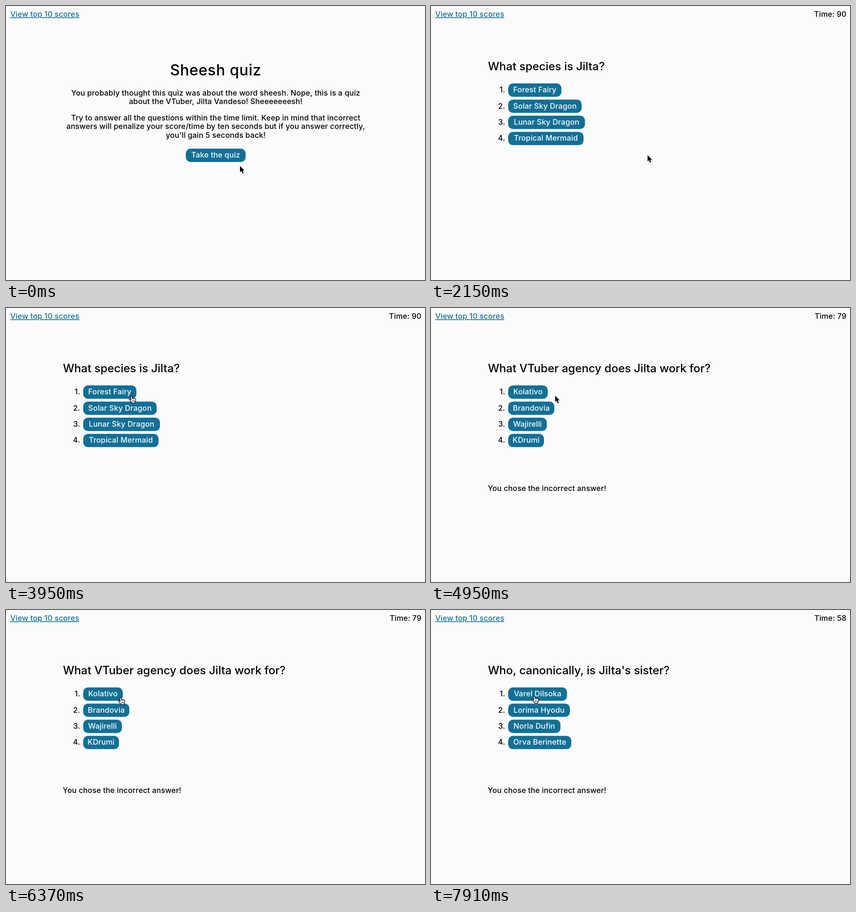
These frames come from a looping animation (890 px wide and 584 px high, 8 s). An HTML page:

```html
<!DOCTYPE html>
<html lang="en">
<head>
<meta charset="utf-8">
<title>Sheesh quiz</title>
<style>
  html, body { margin: 0; width: 100%; height: 100%; overflow: hidden; background: #fbfbfb; }
  svg { display: block; width: 890px; height: 584px; }
  text {
    font: 500 16px Inter, "Open Sans", sans-serif;
    font-optical-sizing: none;
    letter-spacing: .01em;
    white-space: pre;
  }
  .title { font-size: 32px; letter-spacing: .019em; }
  .question { font-size: 24px; letter-spacing: 0; }
  .link { fill: #127096; text-decoration: underline; }
  .middle { text-anchor: middle; }
  .end { text-anchor: end; }
  .button rect { fill: #127096; }
  .button text { fill: #fbfbfb; }
</style>
</head>
<body>
<svg viewBox="0 0 890 584">
  <text class="link" x="9" y="23">View top 10 scores</text>
  <text class="end" id="timer" x="882.5" y="23"></text>
  <g id="page"></g>
  <g id="cursor">
    <path id="arrow" d="M0 0V13.2L3 10.5L5.4 16L7.8 15L5.4 9.7H9.6Z"
          stroke="#fff" stroke-width="1" paint-order="stroke"/>
    <g id="hand" stroke="#000" stroke-linejoin="round" stroke-linecap="round">
      <path fill="#fff" stroke-width="1.2" d="M-1.4 1C-1-.6 .9-.6 1.3 1L2.4 5.2C3.2 4.3 4.6 4.5 5 5.6
        C5.8 4.9 7.1 5.2 7.3 6.2C8.3 5.8 9.4 6.4 9.5 7.5C9.8 9.6 9.5 11 8.4 12.6L8 15.5H1L.4 13.6
        C-1 12-3 10.3-4.4 8.5C-5 7.3-3.5 6.6-2.4 7.4L-.6 9Z"/>
      <path fill="none" stroke-width=".8" d="M2.6 10V13M4.7 10V13M6.8 10V13M2.4 5.2L2.8 7.5M5 5.6L5.2 7.5"/>
    </g>
  </g>
</svg>
<script>
const LOOP = 8000, START = 1990;
const CLICKS = [4900, 6400, 7500];   // wrong answers, ten seconds each
const TICKS = [4600, 7200];          // one second each

const INTRO = [
  [191, "You probably thought this quiz was about the word sheesh. Nope, this is a quiz"],
  [209, "about the VTuber, Jilta Vandeso! Sheeeeeeesh!"],
  [244, "Try to answer all the questions within the time limit. Keep in mind that incorrect"],
  [262, "answers will penalize your score/time by ten seconds but if you answer correctly,"],
  [281, "you'll gain 5 seconds back!"],
];

// Each choice is a label and the width of its button.
const QUESTIONS = [
  ["What species is Jilta?",
    [["Forest Fairy", 113], ["Solar Sky Dragon", 156], ["Lunar Sky Dragon", 163], ["Tropical Mermaid", 160]]],
  ["What VTuber agency does Jilta work for?",
    [["Kolativo", 84], ["Brandovia", 98], ["Wajirelli", 82], ["KDrumi", 76]]],
  ["What is the name of Jilta's companion?",
    [["Wuma", 69], ["Tirf", 49], ["Norla", 63], ["Ashmu", 74]]],
  ["Who, canonically, is Jilta's sister?",
    [["Varel Dilsoka", 125], ["Lorima Hyodu", 131], ["Norla Dufin", 111], ["Orva Berinette", 134]]],
];

// Pointer stops: time, x, y
const PATH = [
  [0, 497, 341], [20, 497, 341], [770, 454, 318], [910, 461, 320], [1310, 460, 318],
  [2830, 460, 318], [3950, 266, 187], [4900, 264, 187], [5630, 244, 187],
  [6400, 243, 186], [7170, 229, 182], [7500, 228, 182], [7910, 219, 183], [LOOP, 219, 183],
];

const $ = id => document.getElementById(id);
const label = (x, y, content, style = "") => `<text class="${style}" x="${x}" y="${y}">${content}</text>`;
const passed = (times, t) => times.filter(time => t >= time).length;

function button(content, { x, y, width }) {
  return `<g class="button"><rect x="${x}" y="${y}" width="${width}" height="28.4" rx="10"/>` +
    label(x + width / 2, y + 19.2, content, "middle") + "</g>";
}

function introPage() {
  const box = { x: 382, y: 304, width: 127 };
  const html = label(445.5, 148, "Sheesh quiz", "title middle") +
    INTRO.map(([y, line]) => label(445.5, y, line, "middle")).join("") +
    button("Take the quiz", box);
  return { html, boxes: [box] };
}

function questionPage([question, choices], index) {
  const boxes = choices.map(([, width], i) => ({ x: 164, y: 165 + i * 34.4, width }));
  const html = label(121, 137, question, "question") +
    choices.map(([name], i) =>
      label(157.5, boxes[i].y + 19.2, `${i + 1}.`, "end") + button(name, boxes[i])).join("") +
    (index ? label(120.5, 390, "You chose the incorrect answer!") : "");
  return { html, boxes };
}

const pages = [introPage(), ...QUESTIONS.map(questionPage)];
let shown = -1;

function pointerAt(t) {
  const i = PATH.findIndex(stop => stop[0] > t);
  const [t0, x0, y0] = PATH[i - 1], [t1, x1, y1] = PATH[i];
  const p = (t - t0) / (t1 - t0), ease = p * p * (3 - 2 * p);
  return [x0 + (x1 - x0) * ease, y0 + (y1 - y0) * ease];
}

function draw(now) {
  const t = now % LOOP;
  const current = passed([START, ...CLICKS], t);
  const page = pages[current];
  if (current !== shown) {
    $("page").innerHTML = page.html;
    shown = current;
  }
  $("timer").textContent = current
    ? `Time: ${90 - passed(TICKS, t) - 10 * passed(CLICKS, t)}` : "";

  const [x, y] = pointerAt(t);
  const hovering = page.boxes.some(b => x >= b.x && x <= b.x + b.width && y >= b.y && y <= b.y + 28.4);
  $("cursor").setAttribute("transform", `translate(${x} ${y})`);
  $("hand").style.display = hovering ? "" : "none";
  $("arrow").style.display = hovering ? "none" : "";
}

const begin = performance.now();
function frame() {
  draw(performance.now() - begin);
  requestAnimationFrame(frame);
}
frame();
</script>
</body>
</html>
```
